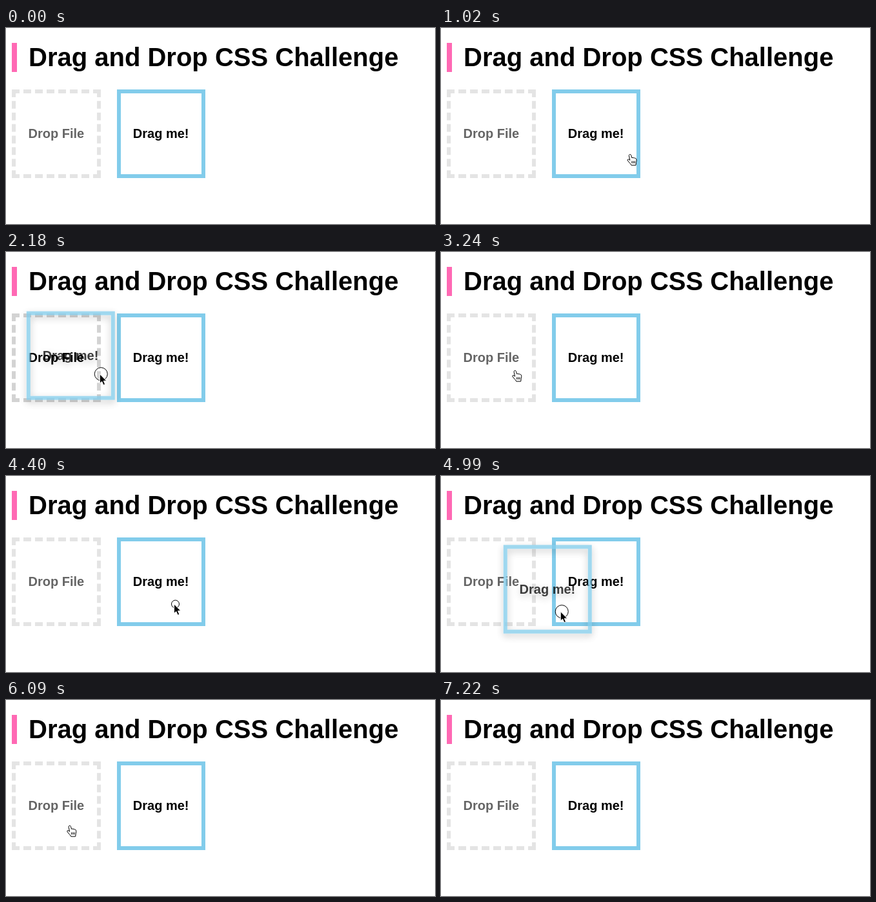
Write an HTML page that moves like this. It is 665 by 303 pixels and loops after 7820 ms.

```html
<!DOCTYPE html>
<html lang="en">
<head>
<meta charset="utf-8">
<title>Drag and Drop CSS Challenge</title>
<style>
  html, body { margin: 0; width: 100%; height: 100%; overflow: hidden; background: #fff; }
  svg { display: block; }
  text { font: bold 20px "Liberation Sans", Arial, sans-serif; }
  #title { font-size: 40px; }
  .mid { text-anchor: middle; }
  .edge { stroke: lightgray; stroke-width: 6; }
</style>
</head>
<body>
<svg width="665" height="303" viewBox="0 0 665 303">
  <defs>
    <filter id="shadow" filterUnits="userSpaceOnUse" x="135" y="60" width="215" height="215">
      <feDropShadow dx="0" dy="4" stdDeviation="6" flood-color="#000" flood-opacity=".28"/>
    </filter>
    <g id="card">
      <rect x="175" y="98" width="131" height="131" fill="none" stroke="#82cceb" stroke-width="6"/>
      <text class="mid" x="240.2" y="170">Drag me!</text>
    </g>
  </defs>

  <rect x="9" y="23" width="8" height="45" fill="hotpink"/>
  <text id="title" x="35" y="59">Drag and Drop CSS Challenge</text>

  <g id="zone">
    <g class="edge">
      <path d="M9 98H147M9 229H147" stroke-dasharray="12 6"/>
      <path d="M12 95V232M144 95V232" stroke-dasharray="12 5.857"/>
    </g>
    <text class="mid" x="77.8" y="170">Drop File</text>
  </g>

  <use href="#card"/>
  <g id="ghost" opacity=".76"><use href="#card" filter="url(#shadow)"/></g>

  <g id="cursor">
    <circle id="ring" cx=".5" r="10" fill="none" stroke="#000"/>
    <path id="arrow" transform="translate(-1.5 0)" fill="#000" stroke="#fff" stroke-linejoin="round"
      d="M0 0V14.5L3.3 11.5L5.7 17L8.3 15.9L6 10.6H10.5Z"/>
    <g id="hand" transform="translate(-7 -.5)" fill="#fff" stroke="#000" stroke-linejoin="round">
      <path d="M4.2.8Q5.8.2 6.4 2L7.5 6q1.3-.9 2.4.1q1.4-.6 2.3.5q1.6-.3 2.2 1.1q.9 2.6-.1 5l-.6 4.8H6.8
        q-1.2-2.2-2.8-3.7L1 10.2q-.6-1.8 1-2q1.2.2 2.6 1.6L3.1 2.9Q2.9 1.4 4.2.8z"/>
      <path d="M7.7 11v3.5M9.9 11v3.5M12 11v3.5"/>
    </g>
  </g>
</svg>
<script>
  const LOOP = 7820, APPEAR = 500, VANISH = 7220;
  const $ = id => document.getElementById(id);
  const show = (id, on) => $(id).setAttribute("visibility", on ? "visible" : "hidden");
  const move = (id, x, y) => $(id).setAttribute("transform", `translate(${x.toFixed(2)} ${y.toFixed(2)})`);

  const easeOut = u => u * (2 - u);
  const smooth = u => u * u * (3 - 2 * u);

  const entry = { x: 538, y: 288 }, exit = { x: 185, y: 236 };
  const grab1 = { x: 287, y: 192 }, drop1 = { x: 117, y: 183 };
  const grab2 = { x: 262, y: 198 }, drop2 = { x: 101, y: 194 };

  // The pointer moves in equal time steps; lead is the progress made by the first one, sag bows the path down
  const moves = [
    { from: entry, to: grab1, start: 500, end: 1140, steps: 12, lead: 0, sag: 0, ease: easeOut },
    { from: grab1, to: drop1, start: 1550, end: 2400, steps: 16, lead: 0, sag: 7, ease: smooth },
    { from: drop1, to: grab2, start: 3830, end: 4170, steps: 7, lead: 1, sag: 0, ease: smooth },
    { from: grab2, to: drop2, start: 4760, end: 5320, steps: 11, lead: 1.5, sag: 13.5, ease: smooth },
    { from: drop2, to: exit, start: 7110, end: 7165, steps: 2, lead: 1, sag: 0, ease: smooth }
  ];

  const drags = [
    { grab: grab1, press: 1310, full: 1370, lift: 1550, drop: 3240, release: 3240 },
    { grab: grab2, press: 4400, full: 4520, lift: 4760, drop: 6030, release: 6090 }
  ];

  function pointerAt(t) {
    const m = moves.findLast(m => t >= m.start);
    if (!m) return entry;
    const last = m.steps - 1;
    const step = Math.min(last, Math.floor((t - m.start + 3) / (m.end - m.start) * last));
    const p = m.ease((step + m.lead) / (last + m.lead));
    return {
      x: m.from.x + (m.to.x - m.from.x) * p,
      y: m.from.y + (m.to.y - m.from.y) * p + m.sag * 4 * p * (1 - p)
    };
  }

  const inside = ({ x, y }, left) => x >= left && x < left + 138 && y >= 95 && y < 232;

  function draw(t) {
    const pointer = pointerAt(t);
    const drag = drags.find(d => t >= d.press && t < d.release);
    const held = drag && t < drag.drop;
    const lifted = held && t >= drag.lift;
    const visible = t >= APPEAR && t < VANISH;
    const hand = !drag && (inside(pointer, 9) || inside(pointer, 172));

    move("cursor", pointer.x, pointer.y);
    show("ring", visible && held);
    show("arrow", visible && !hand);
    show("hand", visible && hand);
    $("ring").setAttribute("r", held && t < drag.full ? 6 : 10);
    $("zone").setAttribute("opacity", lifted && inside(pointer, 9) ? 1 : 0.6);

    show("ghost", lifted);
    if (lifted) move("ghost", pointer.x - drag.grab.x, pointer.y - drag.grab.y);
  }

  const begin = performance.now();
  function tick() {
    draw((performance.now() - begin) % LOOP);
    requestAnimationFrame(tick);
  }
  tick();
</script>
</body>
</html>
```
